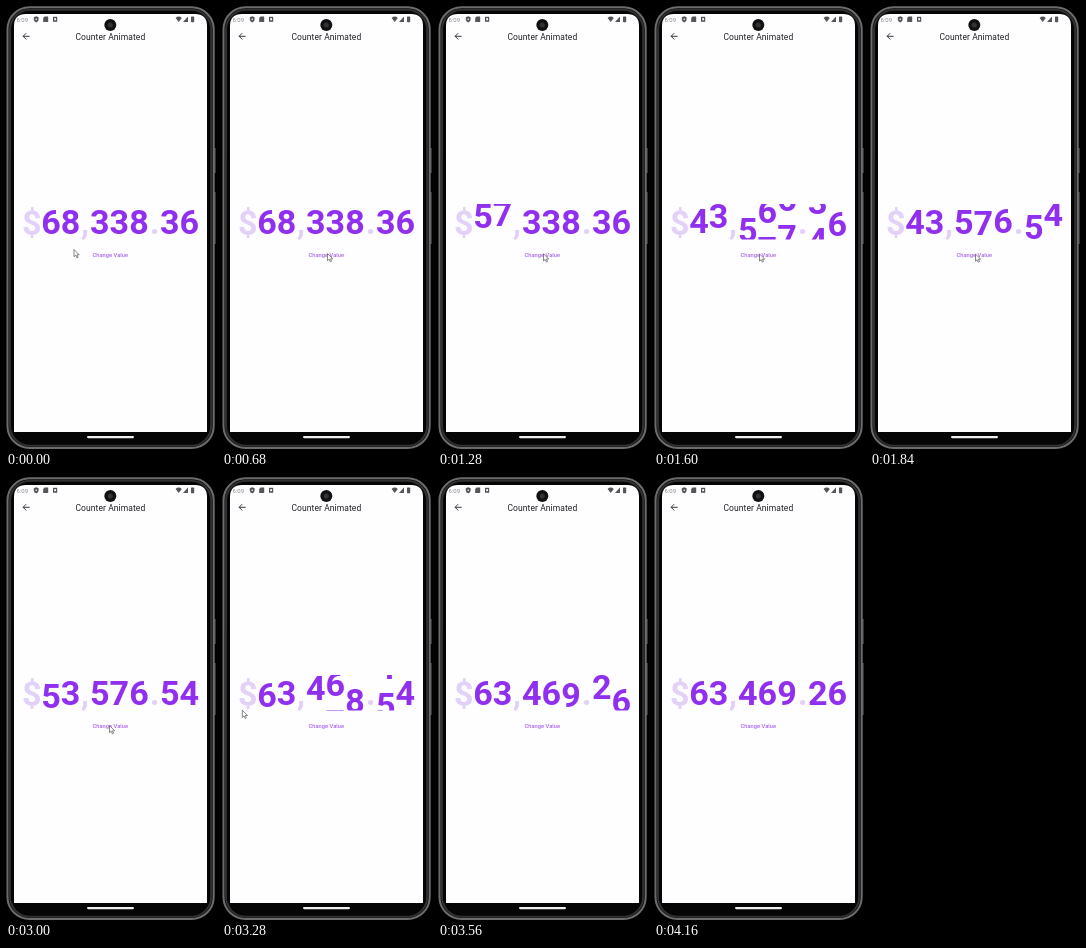
Write an HTML page that moves like this. It is 210 by 443 pixels and loops after 4.2 s.

```html
<!DOCTYPE html>
<html lang="en">
<head>
<meta charset="utf-8">
<title>Counter Animated</title>
<style>
  html, body { margin: 0; width: 100%; height: 100%; overflow: hidden; background: #000; }
  svg { display: block; width: 100%; height: 100%; }
  text { font-family: Roboto, sans-serif; text-anchor: middle; }
  .counter { font-size: 34.1px; font-weight: 700; fill: #9030ee; }
  .pale { fill: #e3d2f8; }
</style>
</head>
<body>
<svg viewBox="0 0 210 443">
  <defs>
    <clipPath id="window"><rect x="8" y="198" width="194" height="35.5"/></clipPath>
  </defs>

  <!-- phone body -->
  <rect width="210" height="443" fill="#000"/>
  <path d="M208.8 142v25M208.8 186v52" stroke="#555" stroke-width="1.6"/>
  <rect x="1.5" y="1.3" width="206.2" height="440.6" rx="22" fill="#080808" stroke="#6c6c6c" stroke-width="2"/>
  <rect x="4" y="3.7" width="201.2" height="436" rx="20" fill="#050505" stroke="#303030" stroke-width="2"/>
  <path d="M8 426V20Q8 8 20 8H189Q201 8 201 20V426Z" fill="#fefdff"/>
  <rect x="81" y="430" width="47" height="2.2" rx="1.1" fill="#eee"/>
  <circle cx="104.3" cy="19" r="6" fill="#111"/>
  <circle cx="104.3" cy="19" r="2.6" fill="#333"/>

  <!-- status bar -->
  <g fill="#555">
    <text x="16.3" y="15.6" font-size="6" fill="#888">6:09</text>
    <path d="M27.8 11.3l2.4-1 2.4 1v2.2q0 2-2.4 3-2.4-1-2.4-3z"/>
    <path d="M38.6 10.5h3.6v5.6h-5v-4.2z"/>
    <path d="M47 10.8h4.2v5H47z"/>
    <path d="M169.6 12q3.1-2.8 6.2 0l-3.1 4z"/>
    <path d="M182 10.6v5.4h-5z"/>
    <rect x="185" y="10.4" width="3.2" height="5.8" rx=".6"/>
  </g>
  <circle cx="30.2" cy="13.2" r=".8" fill="#fff"/>
  <rect x="48.2" y="12.2" width="1.8" height="2" fill="#fff"/>

  <!-- app bar -->
  <path d="M23.6 30.3H17.2M20.2 27.2l-3.1 3.1 3.1 3.1" fill="none" stroke="#222" stroke-width=".9"/>
  <text x="104.4" y="33.8" font-size="8.5" letter-spacing=".08" fill="#222">Counter Animated</text>

  <g class="counter">
    <g class="pale">
      <text x="25.8" y="228">$</text>
      <text x="79" y="228">,</text>
      <text x="148.6" y="228">.</text>
    </g>
    <g id="digits" clip-path="url(#window)"></g>
  </g>
  <text x="104.3" y="251.2" font-size="5.7" font-weight="500" letter-spacing=".05" fill="#a865ee">Change Value</text>

  <path id="cursor" d="M0 0v7.2l1.7-1.5 1.2 2.6 1.2-.6-1.2-2.4h2.3z" fill="#fff" stroke="#555" stroke-width=".7"/>
</svg>

<script>
const LOOP = 4200, PITCH = 38, BASELINE = 228;
const STAGGER = 50, STIFFNESS = 0.0145;
const VALUES = ["6833836", "4357654", "6346926"];
const STARTS = [1182, 2893];
const CENTERS = [45, 64.6, 93.8, 113.4, 133, 163.7, 183.3];
const SLOTS = [0, 1, 3, 4, 5, 7, 8];   // separators take a stagger slot too

// time, x, y of the pointer tip
const POINTER = [
  [40, 68, 243.5], [400, 105.5, 247.5], [2240, 105.5, 248],
  [2480, 103.5, 248.5], [3120, 103.5, 248.5], [3360, -8, 228]
];

const clamp = v => Math.min(1, Math.max(0, v));
const mix = (a, b, k) => a + (b - a) * k;
const smooth = k => k * k * (3 - 2 * k);

// critically damped spring from 0 to 1
function spring(elapsed) {
  const x = STIFFNESS * Math.max(0, elapsed);
  return 1 - (1 + x) * Math.exp(-x);
}

function make(tag, parent, attributes = {}) {
  const node = document.createElementNS("http://www.w3.org/2000/svg", tag);
  for (const name in attributes) node.setAttribute(name, attributes[name]);
  return parent.appendChild(node);
}

const digits = document.getElementById("digits");
const cursor = document.getElementById("cursor");
const reels = CENTERS.map(x => {
  const reel = make("g", digits);
  for (let n = 0; n < 10; n++) {
    make("text", reel, { x, y: BASELINE + n * PITCH }).textContent = n;
  }
  return reel;
});

function reelPosition(i, t) {
  let position = +VALUES[0][i];
  STARTS.forEach((start, step) => {
    const k = spring(t - start - SLOTS[i] * STAGGER);
    position += (VALUES[step + 1][i] - VALUES[step][i]) * k;
  });
  return position;
}

function pointerPosition(t) {
  let [, x, y] = POINTER[0];
  for (let i = 1; i < POINTER.length; i++) {
    const [t0, x0, y0] = POINTER[i - 1], [t1, x1, y1] = POINTER[i];
    if (t < t0) break;
    const k = smooth(clamp((t - t0) / (t1 - t0)));
    x = mix(x0, x1, k);
    y = mix(y0, y1, k);
  }
  return [x, y];
}

function draw() {
  const t = performance.now() % LOOP;
  reels.forEach((reel, i) =>
    reel.setAttribute("transform", `translate(0 ${-PITCH * reelPosition(i, t)})`));
  cursor.setAttribute("transform", `translate(${pointerPosition(t)})`);
  requestAnimationFrame(draw);
}
draw();
</script>
</body>
</html>
```
